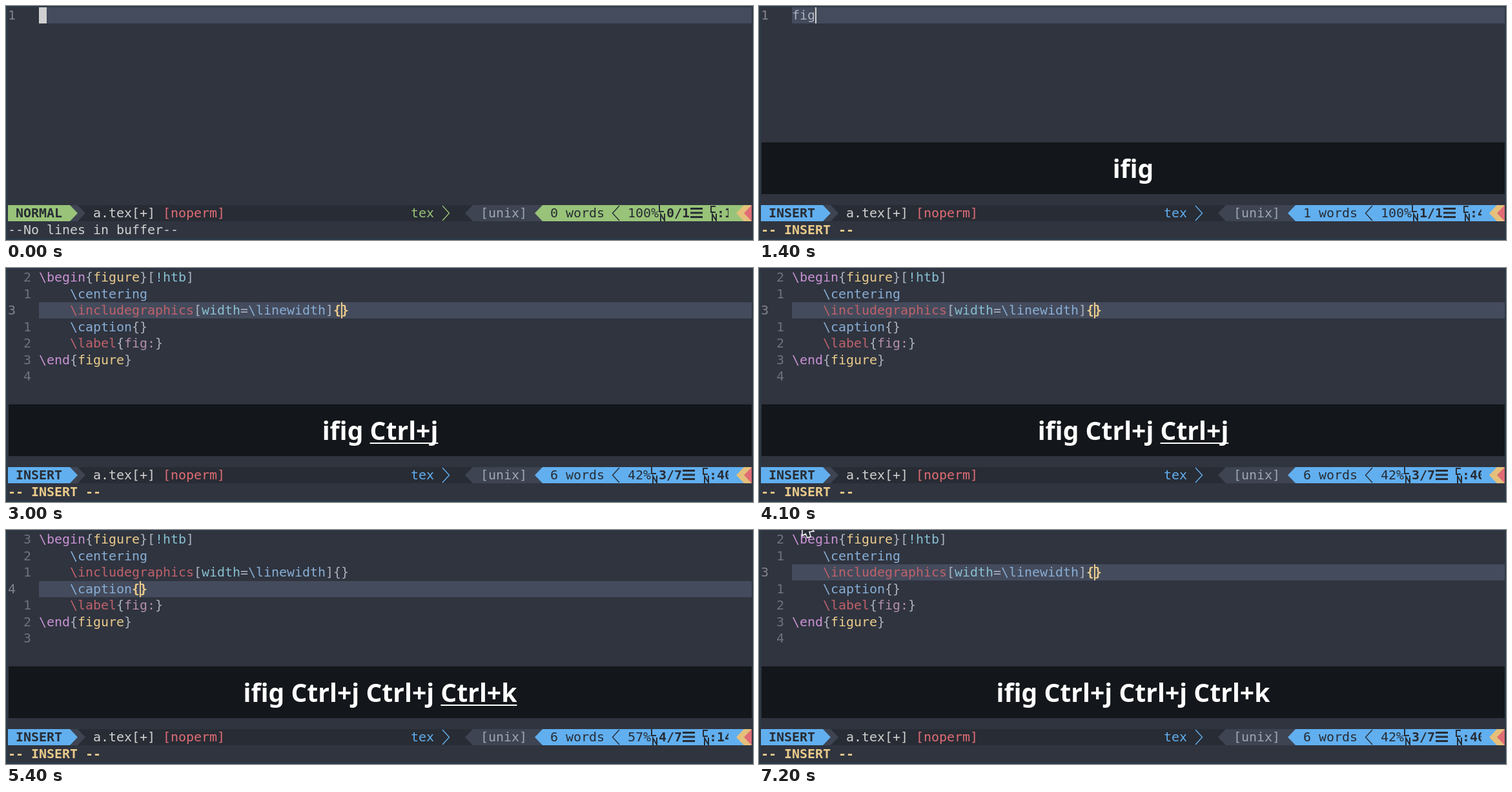
An HTML page with a canvas for the animation above (7.4 s loop, 1157 by 362 pixels).

```html
<!DOCTYPE html>
<html lang="en">
<head>
<meta charset="utf-8">
<title>Snippet editing</title>
<style>
html, body { margin: 0; width: 100%; height: 100%; overflow: hidden; background: #2c3947; }
canvas { display: block; }
</style>
</head>
<body>
<canvas id="stage" width="1157" height="362"></canvas>
<script>
const ctx = document.getElementById('stage').getContext('2d');
const LOOP = 7400, CELL = 12, ROW = 25.5, LEFT = 3, TOP = 2, RIGHT = 1155;
const MONO = '20px "DejaVu Sans Mono", monospace';
const C = {
  frame: '#2c3947', bg: '#2f343f', line: '#444b5c', select: '#3f4b5d',
  num: '#6d737e', current: '#80838a', text: '#abb2bf', bright: '#d0d0d0',
  yellow: '#ebcb8b', purple: '#c991d3', blue: '#88add4', cyan: '#88bfd0',
  red: '#bf616a', mauve: '#b48ead', dark: '#282c34', grey: '#3e4452',
  alert: '#e06c75', orange: '#e5c07b'
};
const MODES = { NORMAL: '#98c379', INSERT: '#61afef', SELECT: '#c678dd' };

// Each line is a list of [text, colour] runs.
const SNIPPET = [
  [['\\begin', C.purple], ['{', C.text], ['figure', C.yellow], ['}[', C.text], ['!htb', C.cyan], [']', C.text]],
  [['    \\centering', C.blue]],
  [['    \\includegraphics', C.red], ['[', C.text], ['width', C.cyan], ['=', C.text], ['\\linewidth', C.blue], [']{}', C.text]],
  [['    \\caption', C.blue], ['{}', C.text]],
  [['    \\label', C.red], ['{', C.text], ['fig:', C.mauve], ['}', C.text]],
  [['\\end', C.purple], ['{', C.text], ['figure', C.yellow], ['}', C.text]],
  []
];

const colX = col => LEFT + col * CELL;
const rowY = row => Math.round(TOP + row * ROW);

function rect(x, y, w, h, color) {
  ctx.fillStyle = color;
  ctx.fillRect(x, y, w, h);
}

function poly(color, ...pts) {
  ctx.fillStyle = color;
  ctx.beginPath();
  for (let i = 0; i < pts.length; i += 2) ctx.lineTo(pts[i], pts[i + 1]);
  ctx.fill();
}

function path(color, width, ...pts) {
  ctx.strokeStyle = color;
  ctx.lineWidth = width;
  ctx.beginPath();
  for (let i = 0; i < pts.length; i += 2) ctx.lineTo(pts[i], pts[i + 1]);
  ctx.stroke();
}

function mono(str, x, row, color, bold) {
  ctx.font = (bold ? 'bold ' : '') + MONO;
  ctx.textAlign = 'left';
  ctx.fillStyle = color;
  const y = rowY(row) + 19;
  for (const ch of str) {
    if (ch !== ' ') ctx.fillText(ch, x, y);
    x += CELL;
  }
  return x;
}

function editorAt(t) {
  if (t < 300) return { mode: 'NORMAL', typed: '', row: 0, col: 0, words: 0, pct: '100%', pos: '0/1', at: 1 };
  if (t < 1500) {
    const n = t < 1000 ? 0 : Math.min(3, Math.floor((t - 1000) / 100) + 1);
    return { mode: 'INSERT', typed: 'fig'.slice(0, n), row: 0, col: n, words: n ? 1 : 0,
      pct: '100%', pos: n ? '1/1' : '0/1', at: n + 1 };
  }
  if (t < 3000) return { mode: 'SELECT', row: 2, col: 36, words: 1, pct: '42%', pos: '3/7', at: 37, cmd: t >= 1700 ? '10' : '' };
  if (t >= 4200 && t < 5600) return { mode: 'INSERT', row: 3, col: 13, words: 6, pct: '57%', pos: '4/7', at: 14 };
  return { mode: 'INSERT', row: 2, col: 39, words: 6, pct: '42%', pos: '3/7', at: 40 };
}

// Keys shown so far, and the newest part that is underlined.
function keysAt(t) {
  if (t < 400) return null;
  if (t < 1000) return { text: 'i', fresh: t < 500 ? 'i' : '' };
  if (t < 3000) {
    const fig = 'fig'.slice(0, Math.floor((t - 1000) / 100) + 1);
    return { text: 'i' + fig, fresh: t < 1400 ? fig : '' };
  }
  const presses = [[3000, 3200, 'Ctrl+j'], [4100, 4300, 'Ctrl+j'], [5400, 5600, 'Ctrl+k']];
  let text = 'ifig', fresh = '';
  for (const [on, off, key] of presses) {
    if (t < on) break;
    text += ' ' + key;
    fresh = t < off ? key : '';
  }
  return { text, fresh };
}

function drawBuffer(e) {
  const y = rowY(e.row), x = colX(4 + e.col - (e.row === 2 && e.mode === 'INSERT' ? 0 : 0));
  const selecting = e.mode === 'SELECT';
  if (selecting) {
    rect(colX(31), y, 10 * CELL, 25, C.select);
    rect(colX(40), y, CELL, 25, '#88add4');
  } else {
    rect(colX(4), y, RIGHT - colX(4), 25, C.line);
  }
  const lines = e.typed === undefined ? SNIPPET : [[[e.typed, C.text]]];
  lines.forEach((runs, row) => {
    const here = row === e.row;
    mono(String(here ? row + 1 : Math.abs(row - e.row)), colX(here ? 0 : 2), row, here ? C.current : C.num);
    let cx = colX(4);
    for (const [str, color] of runs) cx = mono(str, cx, row, color);
  });
  if (selecting) {
    mono('h', colX(40), 2, C.bg);
  } else if (e.mode === 'NORMAL') {
    rect(x, y, CELL, 25, '#d0d0d0');
  } else {
    if (e.typed === undefined) {
      rect(x - CELL, y, 2 * CELL, 25, C.line);
      mono('{}', x - CELL, e.row, C.yellow, true);
    }
    rect(x, y, 2, 25, e.typed === undefined ? C.yellow : C.bright);
  }
}

// Two small stacked letters, N below an L or a C.
function stacked(x, round) {
  if (round) path(C.dark, 2, x + 8, 310, x + 1, 310, x + 1, 319, x + 8, 319);
  else path(C.dark, 2, x + 1, 308, x + 1, 318, x + 8, 318);
  path(C.dark, 2, x + 3, 333, x + 3, 322, x + 9, 332, x + 9, 321);
}

function drawStatus(e) {
  const top = 308, mid = 320.5, end = 333, color = MODES[e.mode];
  rect(LEFT, top, RIGHT - LEFT, 25, C.dark);
  poly(C.grey, 99, top, 111, top, 123, mid, 111, end, 99, end);
  rect(LEFT, top, 96, 25, color);
  poly(color, 99, top, 111, mid, 99, end);
  mono(e.mode, colX(1), 12, C.dark, true);
  mono('a.tex[+]', colX(11), 12, C.bright);
  mono('[noperm]', colX(20), 12, C.alert);
  mono('tex', colX(52), 12, color);
  path(color, 1.4, 676, top + 1, 686.5, mid, 676, end - 1);

  poly(C.grey, 723, top, 711, mid, 723, end);
  rect(723, top, 108, 25, C.grey);
  mono('[unix]', colX(61), 12, '#9fa6b3');
  poly(color, 831, top, 819, mid, 831, end);
  rect(831, top, RIGHT - 831, 25, color);
  mono(e.words + ' words', colX(70), 12, C.dark);
  path(C.dark, 1.4, 950, top + 1, 939.5, mid, 950, end - 1);

  ctx.save();
  ctx.beginPath();
  ctx.rect(831, top, 1119 - 831, 25);
  ctx.clip();
  let x = mono(e.pct, colX(80), 12, C.dark);
  stacked(x, false);
  x = mono(e.pos, x + CELL, 12, C.dark, true);
  for (let i = 0; i < 3; i++) rect(x + 1, 312 + i * 6.5, 19, 3, C.dark);
  stacked(x + 32, true);
  mono(':' + e.at, x + 42, 12, C.dark, true);
  ctx.restore();

  poly(C.orange, RIGHT, top, 1143, top, 1131, mid, 1143, end, RIGHT, end);
  poly(C.alert, RIGHT, top, 1143, mid, RIGHT, end);

  if (e.mode === 'NORMAL') mono('--No lines in buffer--', LEFT, 13, C.bright);
  else mono(`-- ${e.mode} --`, LEFT, 13, C.yellow, true);
  if (e.cmd) mono(e.cmd, colX(85), 13, C.bright);
}

function drawKeys(t) {
  const keys = keysAt(t);
  if (!keys) return;
  const fade = t < 500;
  rect(4, 211, 1151, 80, fade ? '#20252b' : '#13161a');
  ctx.font = 'bold 39.1px "Noto Sans", sans-serif';
  ctx.textAlign = 'left';
  ctx.fillStyle = fade ? '#a0a5ac' : '#fff';
  const w = ctx.measureText(keys.text).width, x = 579.5 - w / 2;
  ctx.fillText(keys.text, x, 266);
  if (keys.fresh) {
    const fw = ctx.measureText(keys.fresh).width;
    ctx.fillRect(x + w - fw, 270, fw, 2);
  }
}

function drawPointer(t) {
  if (t < 6900) return;
  const p = Math.min(3, Math.floor((t - 6900) / 100)) / 3;
  ctx.save();
  ctx.translate(125 - 59 * p, 6 * (1 - p));
  const shape = [1, -18, 1, 9, 6, 6, 9, 12, 14, 10, 12, 3, 19, 2];
  poly('#2b2f38', ...shape);
  path('#f2f2f2', 1.6, ...shape, 1, -18);
  ctx.restore();
}

function draw(t) {
  rect(0, 0, 1157, 362, C.frame);
  rect(LEFT, TOP, RIGHT - LEFT, 357, C.bg);
  const e = editorAt(t);
  drawBuffer(e);
  drawStatus(e);
  drawKeys(t);
  drawPointer(t);
}

const start = performance.now();
function tick() {
  draw((performance.now() - start) % LOOP);
  requestAnimationFrame(tick);
}
tick();
</script>
</body>
</html>
```
